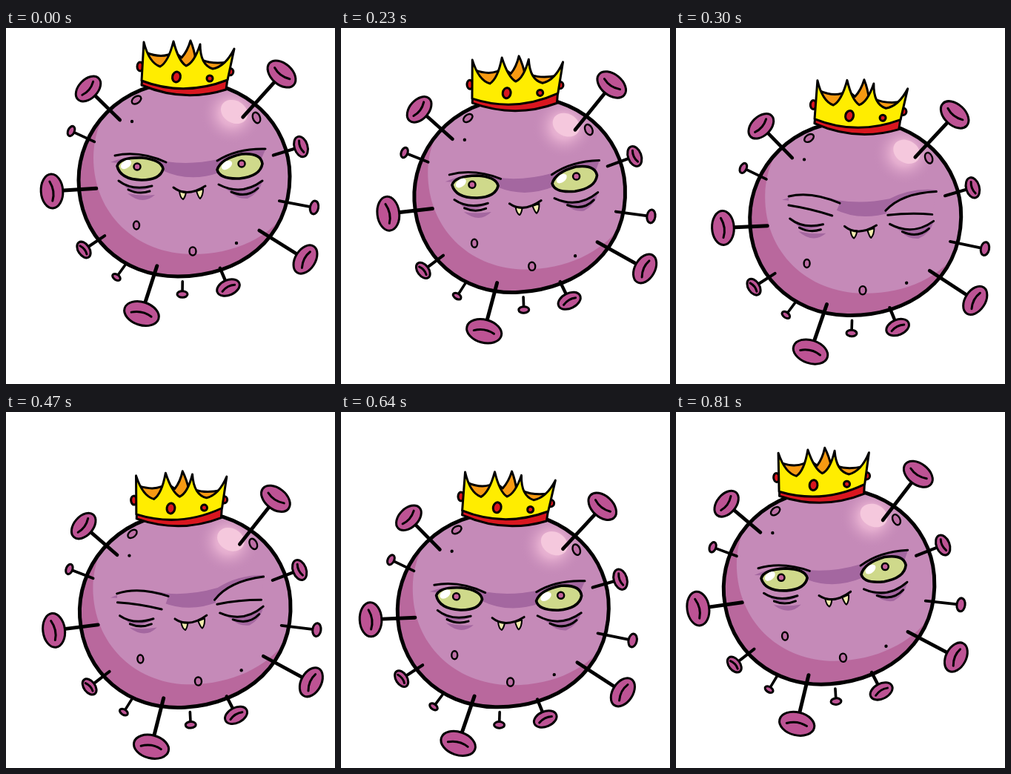
An HTML page for the animation above (0.98 s loop, 444x480 px).

```html
<!DOCTYPE html>
<html lang="en">
<head>
<meta charset="utf-8">
<title>Crowned virus</title>
<style>
  html, body { margin: 0; width: 100%; height: 100%; overflow: hidden; background: #fff; }
  svg { display: block; width: 100%; height: 100%; }
  .ink { fill: none; stroke: #000; stroke-width: 3; stroke-linecap: round; stroke-linejoin: round; }
  .pink { fill: #bd5394; }
  .spot { fill: #bd6fa5; stroke-width: 2.4; }
  .shade { fill: #a467a0; }
  .eye { fill: #cfd98b; stroke-width: 3.6; }
  .pupil { fill: #c35f9a; stroke-width: 2.5; }
  .fang { fill: #f3ecae; stroke-width: 2; }
  .red { fill: #d9161f; }
  .yellow { fill: #ffed00; }
  .orange { fill: #f79a12; }
</style>
</head>
<body>
<svg viewBox="0 0 444 480">
  <defs>
    <path id="shell" d="M98 205C98 140 150 72 245 72C325 72 383 130 383 200C383 285 315 335 232 335C155 335 98 280 98 205Z"/>
    <clipPath id="inside"><use href="#shell"/></clipPath>
    <radialGradient id="glow">
      <stop offset="0" stop-color="#f5c6dc"/>
      <stop offset=".4" stop-color="#e9b2d2" stop-opacity=".85"/>
      <stop offset="1" stop-color="#c58ab8" stop-opacity="0"/>
    </radialGradient>
  </defs>

  <g id="virus">
    <g clip-path="url(#inside)">
      <use href="#shell" fill="#b9689d"/>
      <use href="#shell" x="20" y="-30" fill="#c58ab8"/>
      <circle cx="305" cy="115" r="43" fill="url(#glow)"/>
      <ellipse cx="308" cy="113" rx="19" ry="15" transform="rotate(30 308 113)" fill="#f5c8dd"/>
    </g>
    <use href="#shell" class="ink" style="stroke-width:5"/>
    <g id="spikes" class="ink"></g>

    <g class="ink spot">
      <ellipse cx="176" cy="97" rx="7" ry="4.5" transform="rotate(-35 176 97)"/>
      <ellipse cx="338" cy="121" rx="4.8" ry="7.5" transform="rotate(-22 338 121)"/>
      <ellipse cx="176" cy="266" rx="4" ry="5.5"/>
      <ellipse cx="252" cy="301" rx="4.5" ry="5.6"/>
    </g>
    <circle cx="170" cy="126" r="2.2"/>
    <circle cx="311" cy="290" r="2.2"/>

    <g class="shade">
      <path d="M141 181Q175 167 216 180Q250 185 286 177Q315 161 350 164L344 178L288 195Q247 209 211 192L152 182Z"/>
      <path d="M154 207Q172 220 197 214Q182 222 166 219ZM164 223Q182 227 201 225Q184 240 164 223Z"/>
      <path d="M287 211Q318 227 346 207Q342 222 326 230Q312 231 303 221Z"/>
    </g>

    <g id="openEyes" class="ink">
      <path d="M147 172Q180 165 216 181M285 179Q312 162 350 163"/>
      <path class="eye" d="M150 186Q154 174 184 175Q210 178 212 190Q208 205 183 205Q154 204 150 186Z"/>
      <path class="eye" d="M285 191Q290 176 318 170Q344 168 346 183Q343 200 315 203Q288 204 285 191Z"/>
      <g fill="#fff" stroke="none">
        <ellipse cx="162" cy="184" rx="8" ry="5" transform="rotate(-35 162 184)"/>
        <ellipse cx="298" cy="185" rx="8" ry="5" transform="rotate(-35 298 185)"/>
      </g>
      <circle class="pupil" cx="177" cy="187" r="4.5"/>
      <circle class="pupil" cx="318" cy="183" r="4.5"/>
    </g>

    <g id="closedEyes" class="ink">
      <path fill="#c58ab8" stroke="none" d="M150 177Q180 169 219 184L212 201L150 188ZM281 193Q302 170 349 166L344 197L284 199Z"/>
      <path d="M150 176Q180 168 219 184M150 188Q180 192 209 201M281 193Q302 169 349 166M284 199Q314 195 344 197"/>
    </g>

    <g class="ink">
      <path d="M152 206Q170 220 197 213M165 218Q179 225 194 220M287 211Q318 227 346 206M304 221Q325 230 340 216"/>
      <path class="fang" d="M234 220Q235 229 239 231Q242 228 243 221ZM257 220Q260 229 262 230Q266 226 266 217Z"/>
      <path d="M226 215Q244 229 269 213"/>
    </g>

    <g class="ink">
      <g class="red">
        <ellipse cx="181" cy="52" rx="4" ry="6"/>
        <circle cx="302" cy="59" r="4.8"/>
      </g>
      <path class="orange" d="M189 33Q206 40 219 36L227 32L237 40Q245 31 249 17Q254 29 256 43L264 43Q278 49 299 46L285 60L205 60Z"/>
      <path class="red" d="M184 66L183 77Q240 101 297 83L299 68Z"/>
      <path class="yellow" d="M186 19Q193 47 208 52Q219 46 226 18Q233 45 243 51Q254 47 262 22Q262 50 279 55Q296 52 308 28L299 70Q240 93 183 71Z"/>
      <ellipse class="red" cx="230" cy="66" rx="5.4" ry="7" transform="rotate(12 230 66)"/>
      <circle class="red" cx="275" cy="68" r="4"/>
    </g>
  </g>
</svg>

<script>
const byId = id => document.getElementById(id);
const center = { x: 240, y: 209 };

// A spike grows radially; its head lies across the stalk at (x, y).
function spike([x, y, size]) {
  const dx = x - center.x, dy = y - center.y;
  const reach = Math.hypot(dx, dy);
  const angle = Math.atan2(dy, dx) * 180 / Math.PI;
  const root = 140 - .9 * size, depth = .66 * size;
  const crease = size > 12
    ? `<path d="M0 ${-.55 * size}Q${-.3 * depth} 0 ${.15 * depth} ${.55 * size}"/>` : "";
  return `<g transform="translate(${center.x} ${center.y}) rotate(${angle})">
    <path d="M${root} 0H${reach - depth}" style="stroke-width:${3 + size * .08}"/>
    <g transform="translate(${reach})">
      <ellipse class="pink" rx="${depth - 1}" ry="${size - 1}"/>${crease}
    </g></g>`;
}

const heads = [
  [111, 82, 21], [88, 139, 8], [62, 220, 24], [105, 299, 13],
  [149, 336, 7], [183, 385, 25], [238, 359, 8], [300, 350, 17],
  [404, 312, 22], [416, 242, 10], [398, 160, 15], [372, 62, 23]
];
byId("spikes").innerHTML = heads.map(spike).join("");

// The bob is a wave sampled in six held steps; odd steps tilt left.
function pose(step) {
  const phase = step * Math.PI / 3;
  return {
    x: step < 4 ? Math.min(step, 1.6) : 25 - 11.7 * step,
    y: 38.5 - 31.5 * Math.cos(phase) - 6 * Math.sin(phase) - 7 * Math.cos(2 * phase),
    turn: step % 2 ? -2.6 - .36 * step : Math.min(step / 2, 1),
    asleep: step === 2 || step === 3
  };
}

function draw() {
  const time = performance.now() % 980;
  const { x, y, turn, asleep } = pose(Math.floor((time + 40) / 170));
  byId("virus").setAttribute("transform",
    `translate(${x} ${y}) rotate(${turn} ${center.x} ${center.y})`);
  byId("openEyes").style.display = asleep ? "none" : "";
  byId("closedEyes").style.display = asleep ? "" : "none";
  requestAnimationFrame(draw);
}
draw();
</script>
</body>
</html>
```
